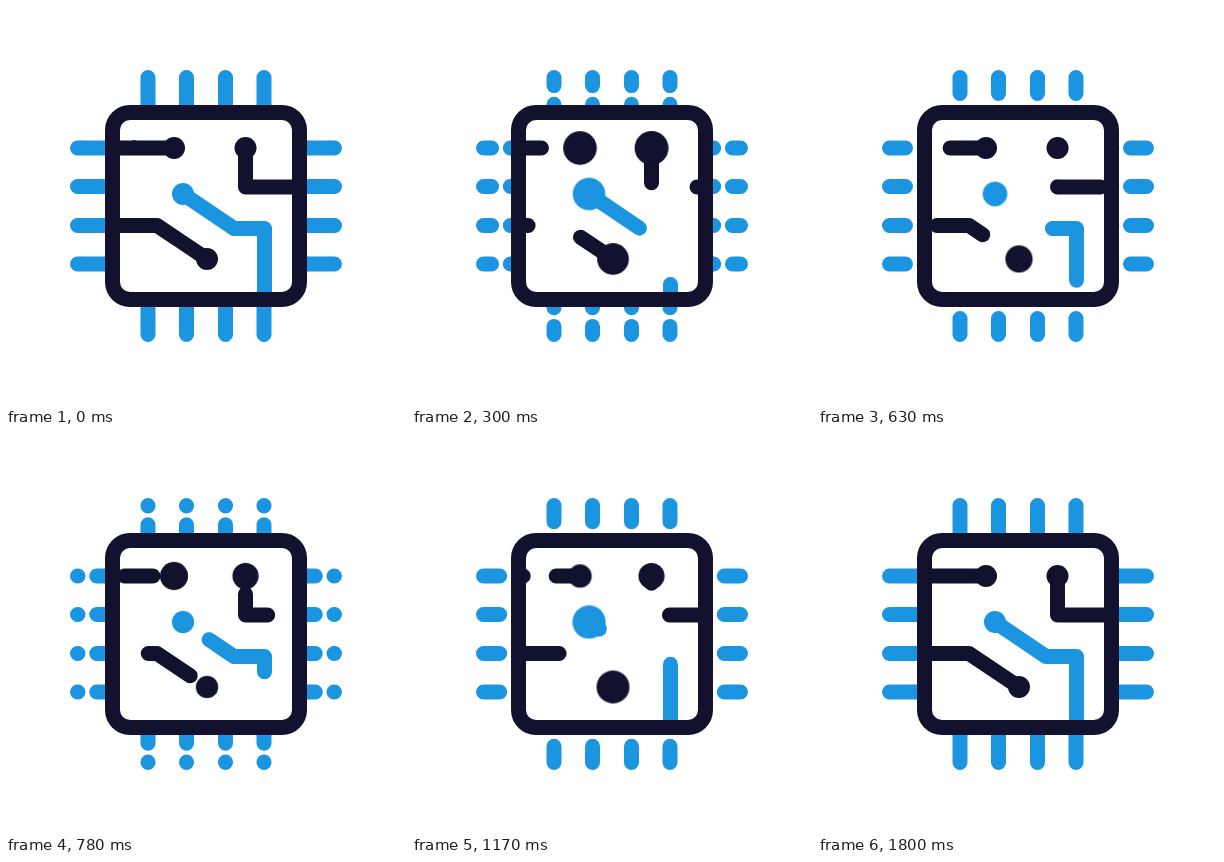
An HTML page that plays this animation: 400x400 px, repeating every 1.83 s.

```html
<!DOCTYPE html>
<html lang="en">
<head>
<meta charset="utf-8">
<title>Chip</title>
<style>
  html, body { margin: 0; width: 100%; height: 100%; overflow: hidden; background: #fff; }
  svg { display: block; width: 100%; height: 100%; }

  .line, .case { fill: none; stroke: var(--ink); stroke-width: 15; stroke-linecap: round; stroke-linejoin: round; }
  .dark { --ink: #12122e; }
  .blue { --ink: #1c95e1; }

  /* Paths run against the current, so the dash start is its leading edge. */
  .line { animation: gap 1830ms linear infinite, flow 1830ms linear infinite; }
  .trace { --from: .643; --to: 3.37; }
  .pins { --from: .113; --to: 6.911; }

  .dot {
    fill: var(--ink);
    transform-box: fill-box;
    transform-origin: center;
    animation: 1830ms cubic-bezier(.37, 0, .63, 1) infinite;
  }
  .d1 { animation-name: pulse1; }
  .d2 { animation-name: pulse2; }
  .d3 { animation-name: pulse3; }
  .d4 { animation-name: pulse4; }

  @keyframes gap {
    0%, 88.5%, 100% { stroke-dasharray: 1 0; }
    16.4%, 65.6% { stroke-dasharray: .465 .535; }
  }
  @keyframes flow {
    from { stroke-dashoffset: var(--from); }
    to { stroke-dashoffset: var(--to); }
  }

  /* Two beats each, at slightly different tempos, then rest. */
  @keyframes pulse1 {
    0%, 33.9%, 67.8%, 100% { transform: scale(1); }
    16.9%, 50.8% { transform: scale(1.53); }
  }
  @keyframes pulse2 {
    0%, 35.5%, 71%, 100% { transform: scale(1); }
    17.8%, 53.3% { transform: scale(1.55); }
  }
  @keyframes pulse3 {
    0%, 41%, 82%, 100% { transform: scale(1); }
    20.5%, 61.5% { transform: scale(1.53); }
  }
  @keyframes pulse4 {
    0%, 45.1%, 90.2%, 100% { transform: scale(1); }
    22.5%, 67.6% { transform: scale(1.53); }
  }
</style>
</head>
<body>
<svg viewBox="0 0 400 400">
  <g class="blue">
    <path class="line pins" pathLength="16" d="
      M106.5 142h-35 M106.5 180.5h-35 M106.5 219.5h-35 M106.5 258h-35
      M293.5 142h35 M293.5 180.5h35 M293.5 219.5h35 M293.5 258h35
      M142 106.5v-35 M180.5 106.5v-35 M219.5 106.5v-35 M258 106.5v-35
      M142 293.5v35 M180.5 293.5v35 M219.5 293.5v35 M258 293.5v35"/>
    <path class="line trace" pathLength="1" d="M177 188L228 222.5H258.5V293.5"/>
    <circle class="dot d3" cx="177" cy="188" r="11"/>
  </g>
  <g class="dark">
    <path class="line trace" pathLength="1" d="M106.5 142H168"/>
    <path class="line trace" pathLength="1" d="M239.5 142V181H293.5"/>
    <path class="line trace" pathLength="1" d="M201 253L151 219.5H106.5"/>
    <circle class="dot d1" cx="168" cy="142" r="11"/>
    <circle class="dot d2" cx="239.5" cy="142" r="11"/>
    <circle class="dot d4" cx="201" cy="253" r="11"/>
    <rect class="case" x="106.5" y="106.5" width="187" height="187" rx="17.5"/>
  </g>
</svg>
</body>
</html>
```
